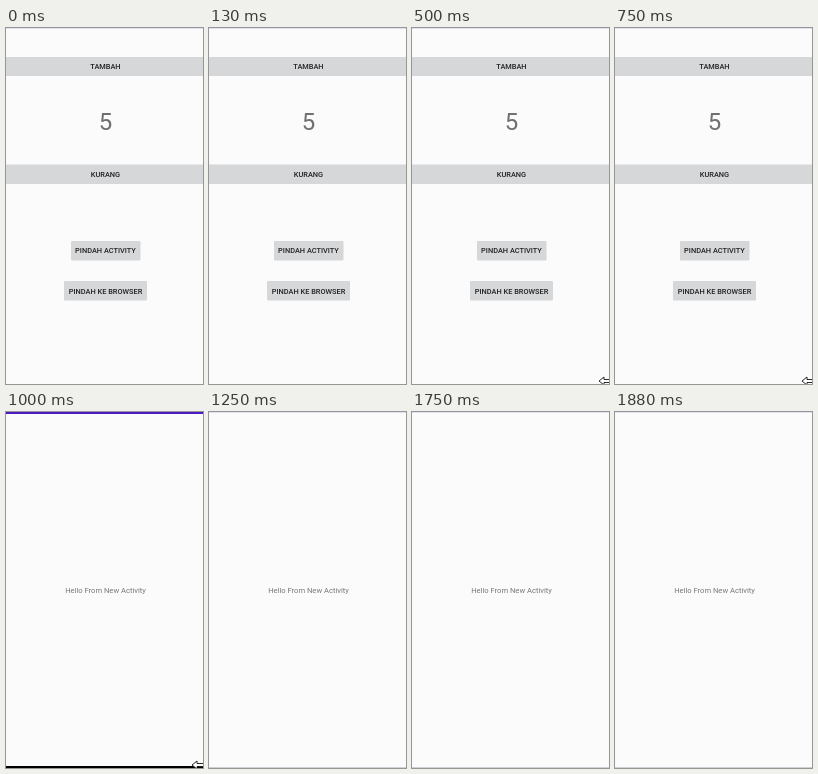
These frames come from a looping animation (197x356 px, 2010 ms). An HTML page:

```html
<!DOCTYPE html>
<html lang="id">
<head>
<meta charset="utf-8">
<title>Activity demo</title>
<style>
  html, body { margin: 0; width: 100%; height: 100%; overflow: hidden; background: #fbfbfc; }
  svg { display: block; width: 197px; height: 356px; }
  text { font-family: Roboto, "Noto Sans", sans-serif; text-anchor: middle; }
  .button rect { fill: #d6d7d9; }
  .button text { font-size: 7.4px; font-weight: 500; fill: #222; }
  .count { font-size: 24px; fill: #707070; }
  .hello { font-size: 7.6px; fill: #777; }

  /* Every change is a hard cut on a shared 2010 ms clock. */
  .main, .second, .bars, .cursor { animation: 2010ms step-end infinite; }
  .main { animation-name: main; }
  .second { animation-name: second; }
  .bars { animation-name: bars; }
  .cursor { animation-name: cursor; }
  @keyframes main { 0% { opacity: 1 } 49.751%, 100% { opacity: 0 } }
  @keyframes second { 0% { opacity: 0 } 49.751%, 100% { opacity: 1 } }
  @keyframes bars { 0% { opacity: 0 } 49.751% { opacity: 1 } 62.189%, 100% { opacity: 0 } }
  @keyframes cursor {
    0% { opacity: 0; transform: translate(196px, 355px) }
    18.905% { opacity: 1; transform: translate(186.5px, 355px) }
    24.876% { opacity: 1; transform: translate(187px, 353px) }
    49.751% { opacity: 1; transform: translate(186px, 353px) }
    62.189%, 100% { opacity: 0; transform: translate(186px, 353px) }
  }
</style>
</head>
<body>
<svg viewBox="0 0 197 356">
  <rect width="197" height="356" fill="#fbfbfc"/>
  <rect width="197" height="1" fill="#e6def0"/>
  <g class="main">
    <g class="button">
      <rect y="29" width="197" height="19"/>
      <text x="99.5" y="41.3">TAMBAH</text>
    </g>
    <text class="count" x="99.5" y="102">5</text>
    <g class="button">
      <rect y="136.5" width="197" height="19.5"/>
      <text x="99.5" y="149">KURANG</text>
    </g>
    <g class="button">
      <rect x="65" y="213" width="69.5" height="19.5" rx="1"/>
      <text x="99.5" y="225.3">PINDAH ACTIVITY</text>
    </g>
    <g class="button">
      <rect x="58" y="253" width="83" height="19.5" rx="1"/>
      <text x="99.5" y="265.5">PINDAH KE BROWSER</text>
    </g>
  </g>
  <g class="second">
    <text class="hello" x="99.5" y="181">Hello From New Activity</text>
    <rect y="355" width="197" height="1" fill="#d2d0d6"/>
  </g>
  <g class="bars">
    <rect width="197" height="2" fill="#4a1cc0"/>
    <rect y="354" width="197" height="2" fill="#000"/>
  </g>
  <path class="cursor" d="M0 0L5-4V-1.5H12V1.5H5V4Z" fill="#fff" stroke="#111" stroke-width=".9"/>
</svg>
</body>
</html>
```
